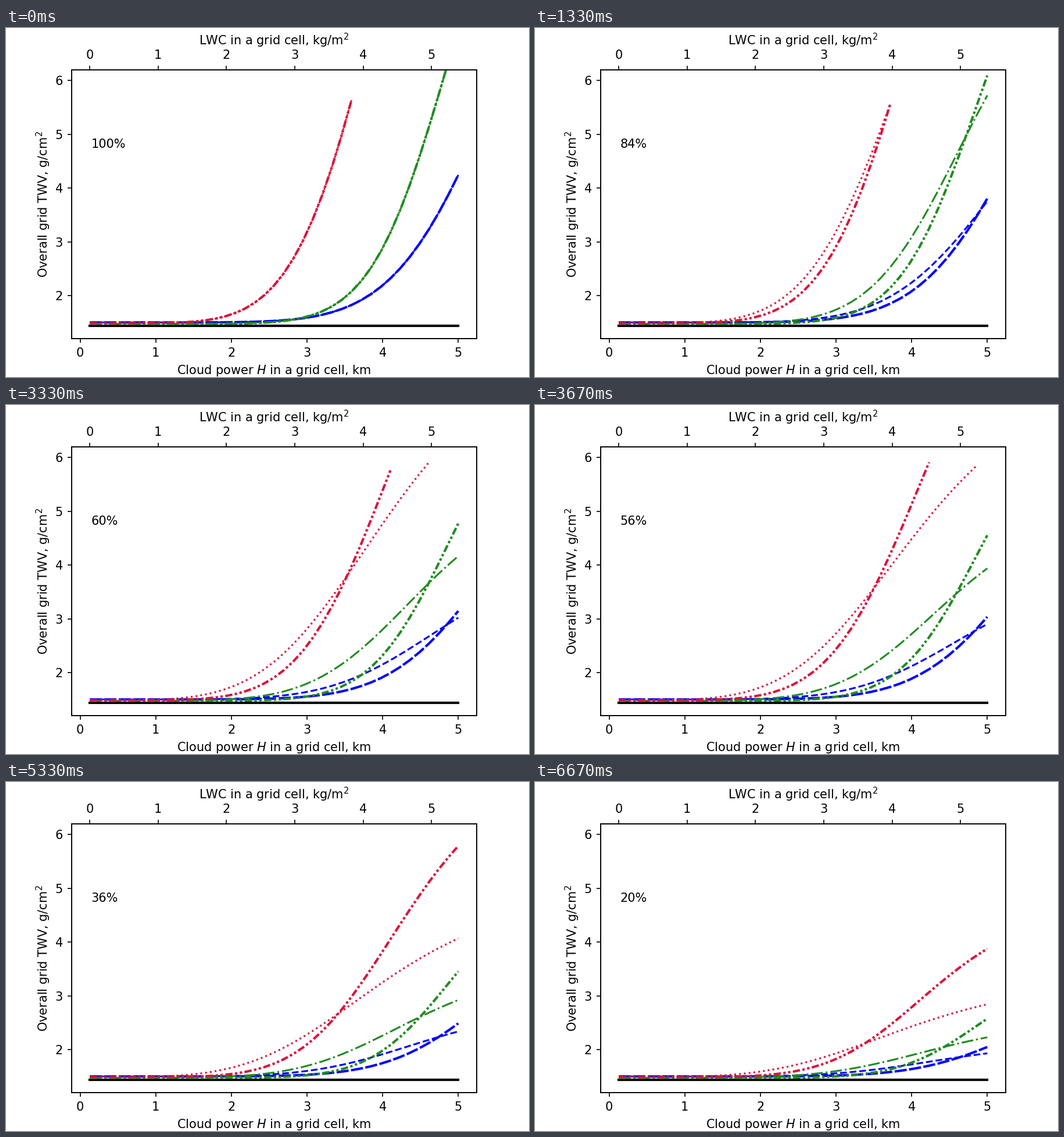
A matplotlib script that plays this animation: 900x600 px, repeating every 7 s.

```python
import numpy as np
import matplotlib.pyplot as plt
from matplotlib.animation import FuncAnimation

STATES = 21
LOOP_MS = 7000
TICK_MS = 40
CLEAR_SKY = 1.433
RETRIEVAL_LIMIT = 5.995

H = np.arange(1, 40) * 5 / 39
DASH = (0, (5, 1))
DASH_DOT_DOT = (0, (3, 1, 1, 1, 1, 1))


class Channel:
    """Overcast curve plus its change as the clear share of the cell grows.

    peak: excess at H = 5 as a polynomial in the clear share
    power, bend: (overcast, broken cloud) values of the growth curve
    rate: how fast broken-cloud values take over
    """

    def __init__(self, color, base, peak, power, bend, rate, thick, thin, limit=np.inf):
        self.base, self.peak, self.rate, self.limit = base, peak, rate, limit
        self.power, self.bend = power, bend
        self.thick, = ax.plot([], [], color=color, lw=2, ls=thick)
        self.thin, = ax.plot([], [], color=color, lw=1.5, ls=thin)

    def excess(self, clear):
        fade = np.exp(-self.rate * clear)
        power, bend = (end + (start - end) * fade for start, end in (self.power, self.bend))
        return np.polyval(self.peak, clear) * bend / (1 + (bend - 1) * (5 / H) ** power)

    def update(self, cover):
        for line, clear in ((self.thick, 0), (self.thin, 1 - cover)):
            twv = self.base + cover * self.excess(clear)
            keep = twv <= self.limit
            line.set_data(H[keep], twv[keep])


def liquid(h):
    return 0.132574 * h ** 2.30215


def padded(lo, hi):
    pad = 0.05 * (hi - lo)
    return lo - pad, hi + pad


fig, ax = plt.subplots(figsize=(6, 4), dpi=150)
ax.set_xlim(*padded(H[0], H[-1]))
ax.set_ylim(1.2, 6.2)
ax.set_xlabel("Cloud power $H$ in a grid cell, km")
ax.set_ylabel("Overall grid TWV, g/cm$^2$", labelpad=2.7)
ax.plot(H, np.full(H.size, CLEAR_SKY), color="black", lw=2)

top = ax.twiny()
top.set_xlim(*padded(liquid(H[0]), liquid(H[-1])))
top.set_xlabel("LWC in a grid cell, kg/m$^2$")

label = ax.text(0.145, 4.75, "")
channels = [
    Channel("blue", 1.5, (-0.55, -0.3, 2.745), (7.3, 5.7), (3.64, 1.45), 4,
            DASH, "--"),
    Channel("forestgreen", 1.475, (0.92, -2.9, 5.5), (8.6, 5.3), (2, 1.48), 4,
            DASH_DOT_DOT, "-."),
    Channel("crimson", 1.487, (6.3, -11.5, 11.95), (6, 3.75), (1.4226, 1.4226), 2.5,
            DASH_DOT_DOT, ":", RETRIEVAL_LIMIT),
]


def draw(frame):
    # A state begins on the last tick at or before its exact start.
    state = int(((frame + 1) * TICK_MS - 1) * STATES / LOOP_MS)
    percent = 100 - 4 * state
    label.set_text(f"{percent}%")
    for channel in channels:
        channel.update(percent / 100)
    return [label]


anim = FuncAnimation(fig, draw, frames=LOOP_MS // TICK_MS, interval=TICK_MS,
                     repeat=True, repeat_delay=0, blit=False)
plt.show()
```
